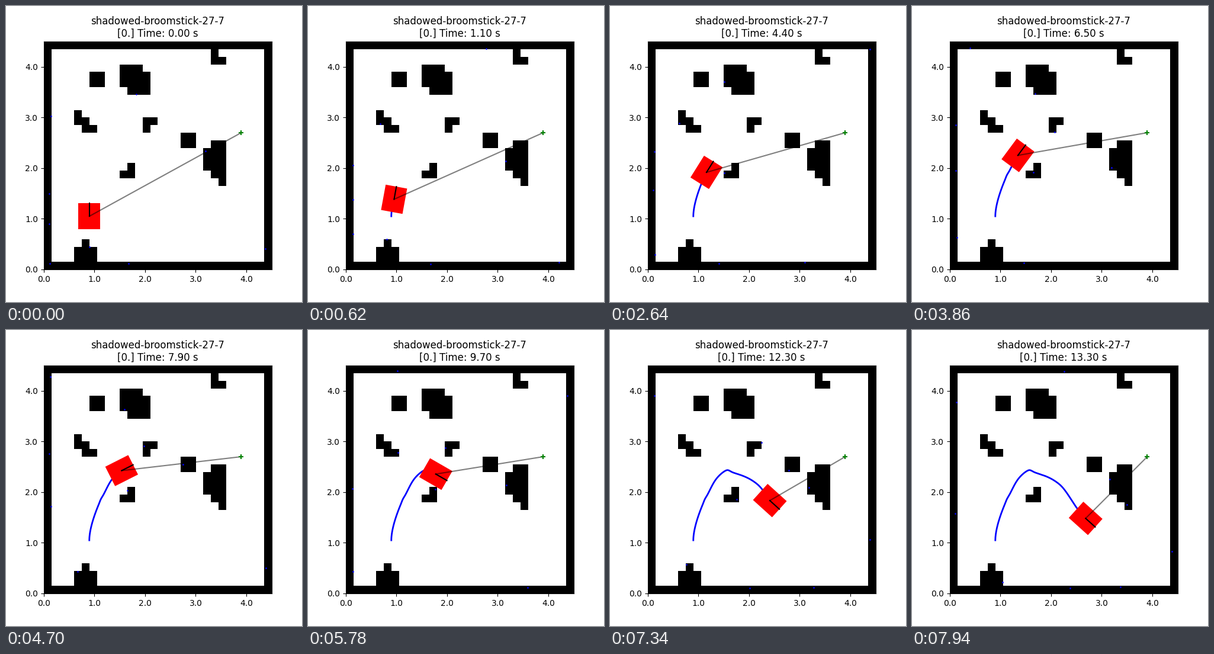
A matplotlib script that plays this animation: 500x500 px, repeating every 8 s.

```python
import numpy as np
import matplotlib.pyplot as plt
from matplotlib.animation import FuncAnimation
from matplotlib.patches import Polygon

CELL, N = 0.15, 30
SIZE = CELL * N
LENGTH, WIDTH = 0.508, 0.43
GOAL = np.array([3.9, 2.7])
TICK_MS, TICKS, STEPS = 20, 400, 134

# Obstacles are walks of a square brush: size, start column, start row, moves.
MOVES = {"L": (-1, 0), "R": (1, 0), "U": (0, 1), "D": (0, -1)}
WALKS = [
    (1, 5, 3, ""), (1, 23, 11, ""), (1, 22, 28, "DR"),
    (1, 13, 18, "UR"), (1, 10, 12, "RU"), (1, 4, 20, "DRDR"),
    (2, 4, 1, "R"), (2, 6, 24, ""), (2, 18, 16, ""),
    (2, 10, 24, "URDDRU"), (2, 22, 15, "DLDRD"),
]

# Waypoints of the drive: step, x, y, heading in degrees.
WAYPOINTS = np.array([
    (0, 0.900, 1.050, 90), (25, 1.078, 1.739, 67.7),
    (44, 1.160, 1.917, 58), (65, 1.346, 2.252, 53.4),
    (79, 1.538, 2.425, 26.8), (92, 1.686, 2.387, -20),
    (113, 2.166, 2.154, -40.2), (133, 2.683, 1.482, -42),
])

BEAMS = np.radians(180 + 39.75 * np.arange(-4, 5))
RANGES = np.linspace(0, 5, 100)


def direction(angle):
    return np.stack([np.cos(angle), np.sin(angle)], axis=-1)


def build_grid():
    grid = np.zeros((N, N))
    grid[[0, -1]] = 1
    grid[:, [0, -1]] = 1
    for size, col, row, moves in WALKS:
        grid[row:row + size, col:col + size] = 1
        for move in moves:
            col, row = col + MOVES[move][0], row + MOVES[move][1]
            grid[row:row + size, col:col + size] = 1
    return grid


def drive():
    """Smooth drive that passes each waypoint along its heading."""
    t, xy, angle = WAYPOINTS[:, 0], WAYPOINTS[:, 1:3], np.radians(WAYPOINTS[:, 3])
    legs = np.hypot(*np.diff(xy, axis=0).T)
    speed = np.gradient(np.append(0, legs.cumsum()), t)
    v = np.column_stack([xy, angle])
    slope = np.column_stack([speed[:, None] * direction(angle), np.gradient(angle, t)])

    steps = np.arange(STEPS)
    i = np.clip(np.searchsorted(t, steps, side="right") - 1, 0, len(t) - 2)
    dt = (t[i + 1] - t[i])[:, None]
    u = (steps - t[i])[:, None] / dt
    ease = u * u * (3 - 2 * u)
    pose = (v[i] + ease * (v[i + 1] - v[i])
            + dt * u * (1 - u) * ((1 - u) * slope[i] - u * slope[i + 1]))
    return pose[:, :2], pose[:, 2]


def scan(pos, heading):
    """First occupied sample along each lidar beam."""
    pts = pos + RANGES[None, :, None] * direction(heading + BEAMS)[:, None, :]
    cells = np.floor(pts / CELL + 1e-9).astype(int)
    inside = ((cells >= 0) & (cells < N)).all(axis=-1)
    cells = np.clip(cells, 0, N - 1)
    hit = inside & (grid[cells[..., 1], cells[..., 0]] > 0)
    rays = np.flatnonzero(hit.any(axis=1))
    return pts[rays, hit[rays].argmax(axis=1)]


def outline(pos, heading):
    ahead = direction(heading) * LENGTH / 2
    side = direction(heading + np.pi / 2) * WIDTH / 2
    return [pos + ahead + side, pos + ahead - side,
            pos - ahead - side, pos - ahead + side]


grid = build_grid()
track, headings = drive()

fig, ax = plt.subplots(figsize=(5, 5), dpi=100)
ax.imshow(grid, cmap="gray_r", origin="lower", extent=(0, SIZE, 0, SIZE),
          vmin=0, vmax=1, interpolation="nearest")
for axis in (ax.xaxis, ax.yaxis):
    axis.set_ticks(range(5))
    axis.set_major_formatter("{x:.1f}")
ax.set(xlim=(0, SIZE), ylim=(0, SIZE))

trail, = ax.plot([], [], "b-", lw=2, zorder=2)
robot = ax.add_patch(Polygon(outline(track[0], headings[0]), fc="red", lw=0, zorder=3))
link, = ax.plot([], [], "k-", lw=1.5, alpha=0.5, zorder=4)
nose, = ax.plot([], [], "k-", lw=1.5, zorder=5)
dots, = ax.plot([], [], "bo", ms=2, mew=0, zorder=6)
ax.plot(*GOAL, "g+", ms=6, mew=1.5, zorder=6)
title = ax.set_title("")


def update(tick):
    # Steps alternate between 20 ms and 100 ms.
    step = 2 * (tick // 6) + (tick % 6 > 0)
    pos, heading = track[step], headings[step]
    trail.set_data(*track[:step + 1].T)
    robot.set_xy(outline(pos, heading))
    link.set_data(*np.array([pos, GOAL]).T)
    nose.set_data(*np.array([pos, pos + direction(heading) * LENGTH / 2]).T)
    dots.set_data(*scan(pos, heading).T)
    title.set_text(f"shadowed-broomstick-27-7\n[0.] Time: {step / 10:.2f} s")
    return trail, robot, link, nose, dots, title


anim = FuncAnimation(fig, update, frames=TICKS, interval=TICK_MS,
                     repeat=True, repeat_delay=0)
plt.show()
```
